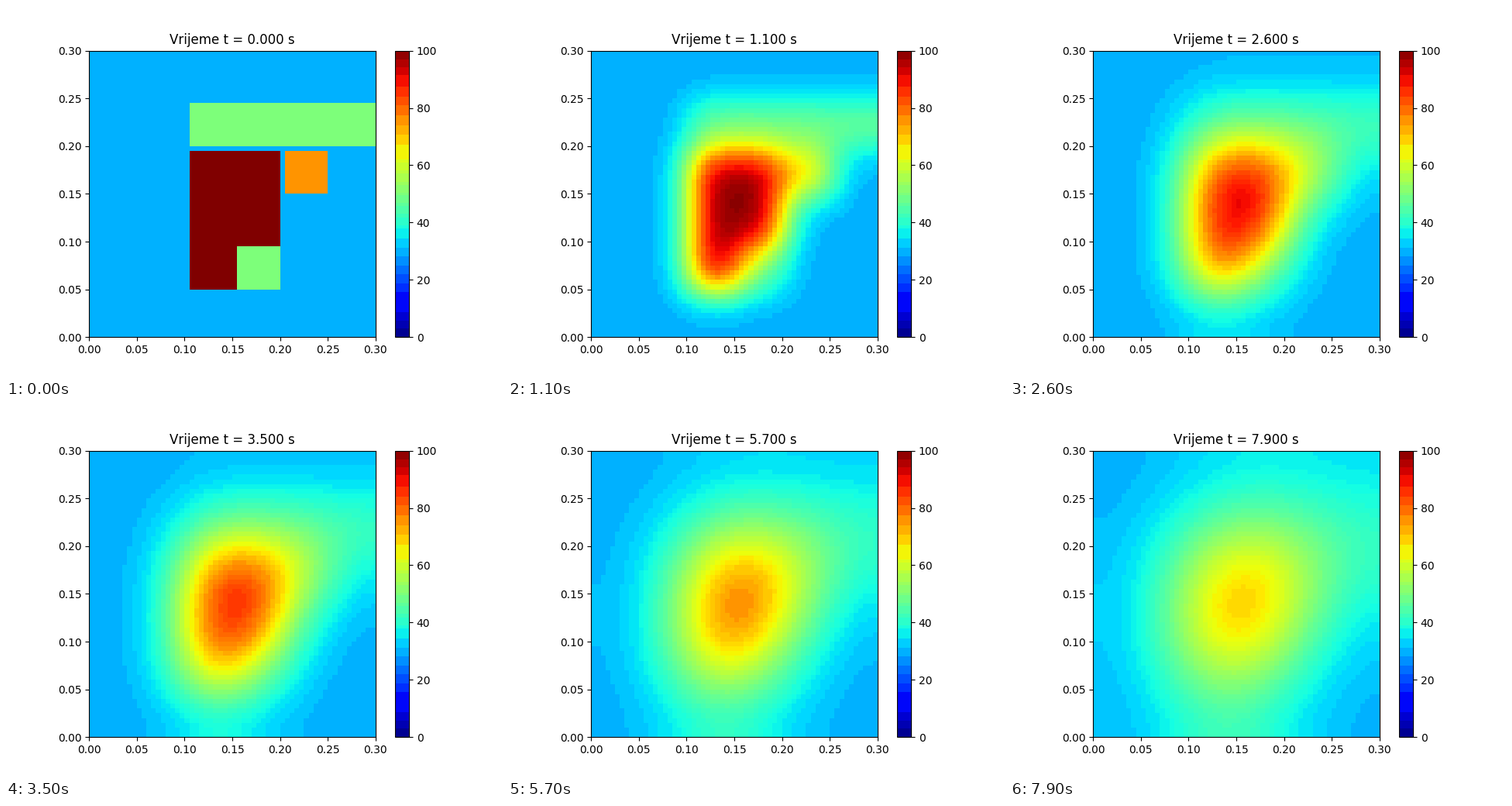
Write a matplotlib script that moves like this. It is 640 px wide and 480 px high and loops after 8000 ms.

```python
import numpy as np
import matplotlib.pyplot as plt
from matplotlib.animation import FuncAnimation
from matplotlib.cm import ScalarMappable
from matplotlib.colors import ListedColormap, Normalize

SIZE = 0.30          # plate side, m
CELLS = 60
DX = SIZE / CELLS
ALPHA = 1.6563e-4    # thermal diffusivity, m^2/s
DT = 0.001
STEPS = 100          # solver steps per picture
FRAMES = 80
INTERVAL = 100


def start_field():
    u = np.full((CELLS + 1, CELLS + 1), 30.0)
    u[10:39, 21:40] = 100
    u[10:19, 31:40] = 50
    u[30:39, 41:50] = 75
    u[40:49, 21:] = 50
    return u


def advance(u):
    """Explicit heat equation step with insulated edges."""
    c = u[1:-1, 1:-1]
    lap = u[2:, 1:-1] + u[:-2, 1:-1] + u[1:-1, 2:] + u[1:-1, :-2] - 4 * c
    u[1:-1, 1:-1] = c + ALPHA * DT / DX**2 * lap
    u[0], u[-1] = u[1], u[-2]
    u[:, 0], u[:, -1] = u[:, 1], u[:, -2]


def solve():
    u = start_field()
    fields = [u[:-1, :-1].copy()]
    for _ in range(FRAMES - 1):
        for _ in range(STEPS):
            advance(u)
        fields.append(u[:-1, :-1].copy())
    return fields


def banded_jet(step, weights):
    """Jet with neighbouring shades merged into RGB bins of the given step."""
    rgb = plt.get_cmap("jet")(np.arange(256))[:, :3]
    bins = np.floor(rgb * 255).astype(int) // step
    _, group = np.unique(bins, axis=0, return_inverse=True)
    group = group.ravel()
    total = np.bincount(group, weights)
    mean = [np.bincount(group, weights * ch) / total for ch in rgb.T]
    return ListedColormap(np.transpose(mean)[group])


fields = solve()
index = np.minimum(fields[0] * 2.56, 255).astype(int)
weights = 1 + 1.5 * np.bincount(index.ravel(), minlength=256)
norm = Normalize(0, 100)

fig, ax = plt.subplots(figsize=(6.4, 4.8), dpi=100)
edges = np.linspace(0, SIZE, CELLS + 1)
mesh = ax.pcolormesh(edges, edges, fields[0], norm=norm,
                     cmap=banded_jet(16, weights))
ax.set_aspect("equal")
ax.set_xlim(0, SIZE)
ax.set_ylim(0, SIZE)
fig.colorbar(ScalarMappable(norm, banded_jet(32, weights)), ax=ax)
title = ax.set_title("")


def update(i):
    mesh.set_array(fields[i])
    title.set_text(f"Vrijeme t = {i * STEPS * DT:.3f} s")
    return mesh, title


anim = FuncAnimation(fig, update, frames=FRAMES, interval=INTERVAL,
                     repeat=True, repeat_delay=0, blit=False)
plt.show()
```
